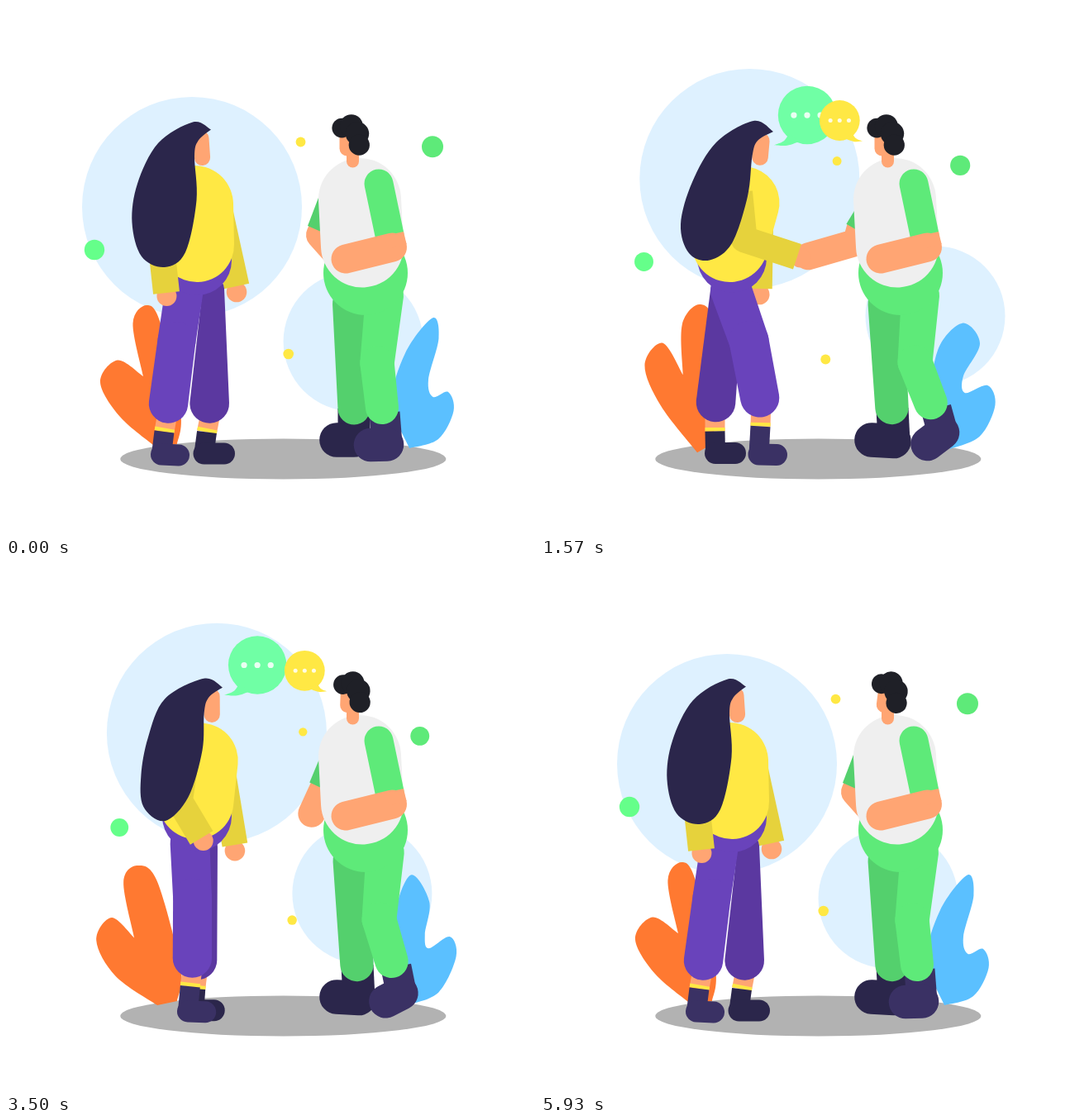
Write an HTML page with a canvas that moves like this. It is 640 by 640 pixels and loops after 6000 ms.

```html
<!DOCTYPE html>
<html lang="en">
<head>
<meta charset="utf-8">
<title>Meeting</title>
<style>
html, body { margin: 0; width: 100%; height: 100%; overflow: hidden; background: #fff; }
canvas { display: block; width: 640px; height: 640px; }
</style>
</head>
<body>
<canvas id="stage" width="640" height="640"></canvas>
<script>
const ctx = document.getElementById('stage').getContext('2d');
const LOOP = 6000;
const C = {
  sky: '#def1ff', ground: '#b2b2b2', orange: '#ff7931', blue: '#5bc0ff',
  yellow: '#ffe844', sleeve: '#e6d23c', skin: '#ffa573', purple: '#6943bb', plum: '#5b38a0',
  navy: '#2b264b', indigo: '#3a3164', green: '#5eea79', leaf: '#54d06d', mint: '#70ffa5',
  lime: '#65ff8a', shirt: '#efefef', black: '#1f2027'
};

// Motion helpers
const lerp = (a, b, k) => a + (b - a) * k;
const mix = (a, b, k) => Array.isArray(a) ? a.map((v, i) => lerp(v, b[i], k)) : lerp(a, b, k);
const smooth = k => k * k * (3 - 2 * k);

function keyed(t, keys) {
  if (t <= keys[0][0]) return keys[0][1];
  for (let i = 1; i < keys.length; i++) {
    const [t0, a] = keys[i - 1], [t1, b] = keys[i];
    if (t < t1) return mix(a, b, smooth((t - t0) / (t1 - t0)));
  }
  return keys[keys.length - 1][1];
}

// Monotone cubic through the keys, without stopping at each one
function spline(t, keys) {
  const last = keys.length - 1;
  const rise = i => (keys[i + 1][1] - keys[i][1]) / (keys[i + 1][0] - keys[i][0]);
  const slope = i => {
    if (i === 0) return rise(0);
    if (i === last) return 0;
    const a = rise(i - 1), b = rise(i);
    return a * b > 0 ? 2 * a * b / (a + b) : 0;
  };
  let i = 0;
  while (i < last - 1 && t > keys[i + 1][0]) i++;
  const h = keys[i + 1][0] - keys[i][0], k = (t - keys[i][0]) / h;
  return lerp(keys[i][1], keys[i + 1][1], smooth(k))
    + h * k * (1 - k) * ((1 - k) * slope(i) - k * slope(i + 1));
}

// Drawing helpers
// Each run is a smooth curve through its points; runs meet in corners
function blob(color, ...runs) {
  ctx.fillStyle = color;
  ctx.beginPath();
  ctx.moveTo(runs[0][0], runs[0][1]);
  for (const p of runs) {
    const n = p.length / 2;
    const at = (i, d) => p[2 * Math.max(0, Math.min(n - 1, i)) + d];
    for (let i = 0; i < n - 1; i++) {
      const [x1, y1] = [0, 1].map(d => at(i, d) + (at(i + 1, d) - at(i - 1, d)) / 6);
      const [x2, y2] = [0, 1].map(d => at(i + 1, d) - (at(i + 2, d) - at(i, d)) / 6);
      ctx.bezierCurveTo(x1, y1, x2, y2, at(i + 1, 0), at(i + 1, 1));
    }
  }
  ctx.fill();
}
function poly(color, p) {
  ctx.fillStyle = color;
  ctx.beginPath();
  for (let i = 0; i < p.length; i += 2) ctx.lineTo(p[i], p[i + 1]);
  ctx.fill();
}
function disc(color, x, y, r, ry = r) {
  ctx.fillStyle = color;
  ctx.beginPath();
  ctx.ellipse(x, y, r, ry, 0, 0, 7);
  ctx.fill();
}
// Tapered capsules along a chain of x, y, r
function taper(color, p) {
  ctx.fillStyle = color;
  for (let i = 0; i + 5 < p.length; i += 3) {
    const [x, y, r, x2, y2, r2] = p.slice(i, i + 6);
    const a = Math.atan2(y2 - y, x2 - x);
    const b = Math.acos(Math.max(-1, Math.min(1, (r - r2) / Math.hypot(x2 - x, y2 - y))));
    ctx.beginPath();
    ctx.arc(x, y, r, a + b, a - b + 2 * Math.PI);
    ctx.arc(x2, y2, r2, a - b, a + b);
    ctx.fill();
  }
}
function limb(color, width, p, cap = 'butt') {
  ctx.strokeStyle = color;
  ctx.lineWidth = width;
  ctx.lineCap = cap;
  ctx.lineJoin = 'round';
  ctx.beginPath();
  for (let i = 0; i < p.length; i += 2) ctx.lineTo(p[i], p[i + 1]);
  ctx.stroke();
}
// p: ankle, sole under the ankle, other end of the foot
function shoe(color, r, shaft, p) {
  const [, , x, y, x2, y2] = p;
  limb(color, shaft, p.slice(0, 4));
  taper(color, [x, y, r, x2, y2, r]);
}

// Plants: rest, right and left sway
const orangeRest = [182, 534, 138, 497, 114, 455, 135, 428.5, 166, 448, 153.5, 384, 170, 362, 187, 384];
const orangeRight = [190, 541, 146, 482, 127, 432, 149, 405, 172.5, 446, 173, 386, 194, 361, 211, 384];
const orangeLeft = [182, 534, 130, 503, 106, 461, 124, 433.5, 152, 455, 136.5, 386, 153, 367, 178, 386];
const blueRest = [488, 535, 467, 480, 483, 420, 516, 377.5, 523.5, 402, 511, 452, 516.5, 473, 535, 467, 541.5, 490, 523, 524];
const blueRight = [496, 536, 474, 480, 480, 415, 509, 384.5, 532, 409, 511, 447, 512.5, 467.5, 541, 458, 550.5, 482, 532, 520];
const blueLeft = [486, 534, 467, 480, 470, 420, 487, 376, 508.5, 410, 506, 450, 511, 466, 536, 451, 543.5, 475, 522, 519];
const sway = (t, rest, right, left) =>
  keyed(t, [[0, rest], [2000, right], [4000, left], [LOOP, rest]]);

// Loose hair, relative to the standing head
const HEAD_SHIFT = 28;
const hairRest = [184, 166, 159, 215, 152.5, 262, 164, 303, 192, 316, 217, 298, 230.5, 235];
const hairLean = [184, 165, 155, 213, 141, 264, 151, 299, 176, 307.5, 203, 287, 222, 230];
const hairHang = [179, 165, 160, 212, 154, 262, 163, 298, 190, 310.5, 216, 282, 227.5, 228];
const hairSwing = [182, 164, 160, 210, 148, 250, 142, 290, 166, 314.5, 198, 285, 223, 225];
const hairFar = [181, 162, 158, 207, 145, 243, 131.5, 292, 148, 313.5, 184, 289, 219, 230];

// Arms: down, hands meet, hands lowered
const reach = (t, down, meet, low) =>
  keyed(t, [[0, down], [1000, meet], [2000, low], [3000, low], [3860, down]]);

function backdrop(t) {
  if (t >= 2000 && t < 2140) limb('#9e9e9e', 2.6, [350, 133, 490, 133]);
  const big = spline(t, [[0, 0], [640, .52], [1070, .72], [2070, .92], [3000, 1], [4140, .69], [5000, .12], [LOOP, 0]]);
  disc(C.sky, 225 + 32.5 * big, 243 - 40.5 * big, 133);
  const x = spline(t, [[0, 420], [640, 459], [1070, 472.5], [1600, 477], [2070, 474.5], [3000, 439], [4140, 425], [LOOP, 420]]);
  disc(C.sky, x, 406 - (x - 420) * .545, 84.5);
  disc(C.ground, 335.3, 548, 197, 24.5);

  const o = sway(t, orangeRest, orangeRight, orangeLeft);
  blob(C.orange, o.slice(0, 10), [...o.slice(8), 211, 490, 207, 530]);
  const b = sway(t, blueRest, blueRight, blueLeft);
  blob(C.blue, [...b, b[0], b[1]]);

  const k = keyed(t, [[0, 0], [3000, 1], [LOOP, 0]]);
  const dot = (color, from, to) => disc(color, ...mix(from, to, k));
  dot(C.yellow, [356.5, 164.5, 5.9], [359.5, 207.5, 5.1]);
  dot(C.green, [516, 170.2, 13], [499.5, 212.5, 11.3]);
  dot(C.lime, [107, 295, 12.2], [139.7, 322, 10.8]);
  dot(C.yellow, [341.7, 421, 6.3], [346.5, 433, 5.7]);
}

function bubble(t, color, x, y, r, side, start, lag) {
  const size = keyed(t, [[start, 0], [start + 180, 1], [5040, 1], [5110, 0]]);
  if (!size) return;
  ctx.save();
  ctx.translate(x, y);
  ctx.scale(size * side * r / 35, size * r / 35);
  disc(color, 0, 0, 35);
  blob(color, [-22, 22, -28, 31, -40, 36], [-40, 36, -24, 36.5, -8, 31]);
  const phase = t % 1000;
  for (let i = 0; i < 3; i++) {
    const on = 20 + 70 * i + lag;
    const s = keyed(phase, [[on, 0], [on + 90, 1], [700, 1], [820, 0]]);
    if (s) disc('rgba(255,255,255,.85)', 16 * (i - 1), 0, 3.6 * s);
  }
  ctx.restore();
}

function man(t) {
  const step = keyed(t, [[0, 0], [640, 1], [3200, 1], [4020, 0]]);
  const plant = keyed(t, [[0, 0], [640, 1]]);
  limb(C.skin, 33, reach(t, [387, 262, 379.5, 277, 400, 300], [384, 265, 383, 282, 328, 294],
    [388, 270, 380, 289, 320, 308.5]), 'round');
  const cuff = reach(t, [378, 232, 365, 266, 381, 273], [380, 243, 367, 262, 381, 270], [379, 250, 371, 265, 380, 270]);
  poly(C.leaf, [...cuff, 395, 276, 395, cuff[1]]);

  shoe(C.navy, 20.8, 39, mix([421, 487, 421, 525, 400, 525], [425, 487, 427, 526.5, 400, 525], plant));
  taper(C.leaf, mix([416, 360, 21, 421, 487, 19.5], [417, 360, 21.5, 424.5, 486, 20.2], plant));
  shoe(C.indigo, 20.3, 37, mix([458, 492, 461, 530.5, 441, 531], [478, 487, 486, 516, 467.5, 530], step));
  taper(C.green, mix([458, 350, 23, 449, 432, 20.7, 455, 486, 20], [459, 350, 23, 452.5, 431, 21, 471.5, 480, 20.3], step));
  disc(C.green, 435, 323, 51);
  taper(C.shirt, [428, 234, 50, 431, 290.5, 50]);
  limb(C.skin, 15, [419.5, 165, 419.5, 188], 'round');

  ctx.save();
  ctx.translate(419.5, 190);
  ctx.rotate(.15 * keyed(t, [[3250, 0], [4000, 1], [5000, .86]]));
  limb(C.skin, 18, [-7, -38, -7, -17.5], 'round');
  disc(C.black, -13.2, -42.4, 11.9);
  disc(C.black, -1.7, -44.8, 14);
  disc(C.black, 5.5, -35.5, 14.2);
  disc(C.black, 7.8, -21.8, 12.6);
  ctx.restore();

  limb(C.green, 35, [451, 215, 464, 277], 'round');
  limb(C.skin, 35, [411, 306, 467.5, 292], 'round');
  poly(C.skin, [450, 280, 481, 273, 484.6, 288, 467, 293]);
}

// p: shin, ankle, heel, toe
function foot(color, p) {
  const [x, y, ax, ay] = p, k = 4.5 / Math.hypot(ax - x, ay - y);
  limb(C.skin, 24, p.slice(0, 4));
  limb(C.yellow, 24, [lerp(ax, x, k), lerp(ay, y, k), ax, ay]);
  shoe(color, 13, 24, p.slice(2));
}

function woman(t, w) {
  const far = reach(t, [259, 248, 279, 339], [262, 250, 250, 338], [268, 262, 273.5, 344.5]);
  disc(C.skin, far[2], far[3] + 7, 12.3);
  limb(C.sleeve, 31, far);

  foot(C.navy, mix([247, 495, 243, 515.5, 239.5, 541.5, 264, 541.5], [210.5, 496, 210.5, 514.5, 211, 541, 235, 541], w));
  taper(C.plum, mix([251, 342, 13, 246.2, 481, 23.8], [225, 345, 20, 211.5, 479.5, 23.8], w));
  foot(C.indigo, mix([195, 495, 191.5, 515, 188, 542.5, 209, 543.5], [266, 490, 265.5, 508.5, 263.5, 542.5, 285, 543], w));
  taper(C.purple, mix([217, 335, 23, 206.5, 405, 23, 196.5, 481, 23.7], [230, 344, 25, 251.5, 405, 24, 264.7, 474, 23.6], w));
  disc(C.purple, 231, lerp(308, 305, w), 42);
  taper(C.yellow, mix([228, 240, 47, 231, 289, 45], [244.5, 238, 44, 228.5, 288, 46], w));

  const near = reach(t, [205, 235, 188, 292, 194, 347], [240, 225, 245, 284, 314.5, 295], [240, 225, 246, 281, 307, 308.5]);
  const [, , ex, ey, hx, hy] = near, k = 1 + 4 / Math.hypot(hx - ex, hy - ey);
  disc(C.skin, lerp(ex, hx, k), lerp(ey, hy, k), 12);
  limb(C.sleeve, 32, near);

  taper(C.skin, mix([236.5, 160, 9, 237.5, 183.5, 9.6], [267, 163, 9.6, 265, 183, 9.8], w));
  const loose = keyed(t, [[0, hairRest], [900, hairLean], [2070, hairLean], [3000, hairHang],
    [4140, hairSwing], [5000, hairFar], [5930, hairRest]]).map((v, i) => i % 2 ? v : v + HEAD_SHIFT * w);
  const [tx, ty, ...fringe] = mix([248, 149.5, 226, 140.5, 228, 182, 232.5, 163], [281, 152, 257, 139, 255.5, 182, 262, 163], w);
  blob(C.navy, [tx, ty, ...fringe.slice(0, 2), ...loose, ...fringe.slice(2), tx, ty]);
}

function draw(now) {
  const t = now % LOOP;
  const w = keyed(t, [[0, 0], [640, 1], [3060, 1], [3860, 0]]);
  ctx.fillStyle = '#fff';
  ctx.fillRect(0, 0, 640, 640);
  backdrop(t);
  man(t);
  woman(t, w);
  const greenY = keyed(t, [[500, 123.5], [1070, 129], [2070, 135], [3000, 123.5]]);
  const yellowY = keyed(t, [[600, 132], [1070, 137], [2070, 140], [3000, 127], [4140, 135], [5000, 132]]);
  bubble(t, C.mint, 291 + 31 * w, greenY, 35.2, 1, 500, 0);
  bubble(t, C.yellow, 361.3, yellowY, 24.4, -1, 620, 10);
  requestAnimationFrame(draw);
}
requestAnimationFrame(draw);
</script>
</body>
</html>
```
